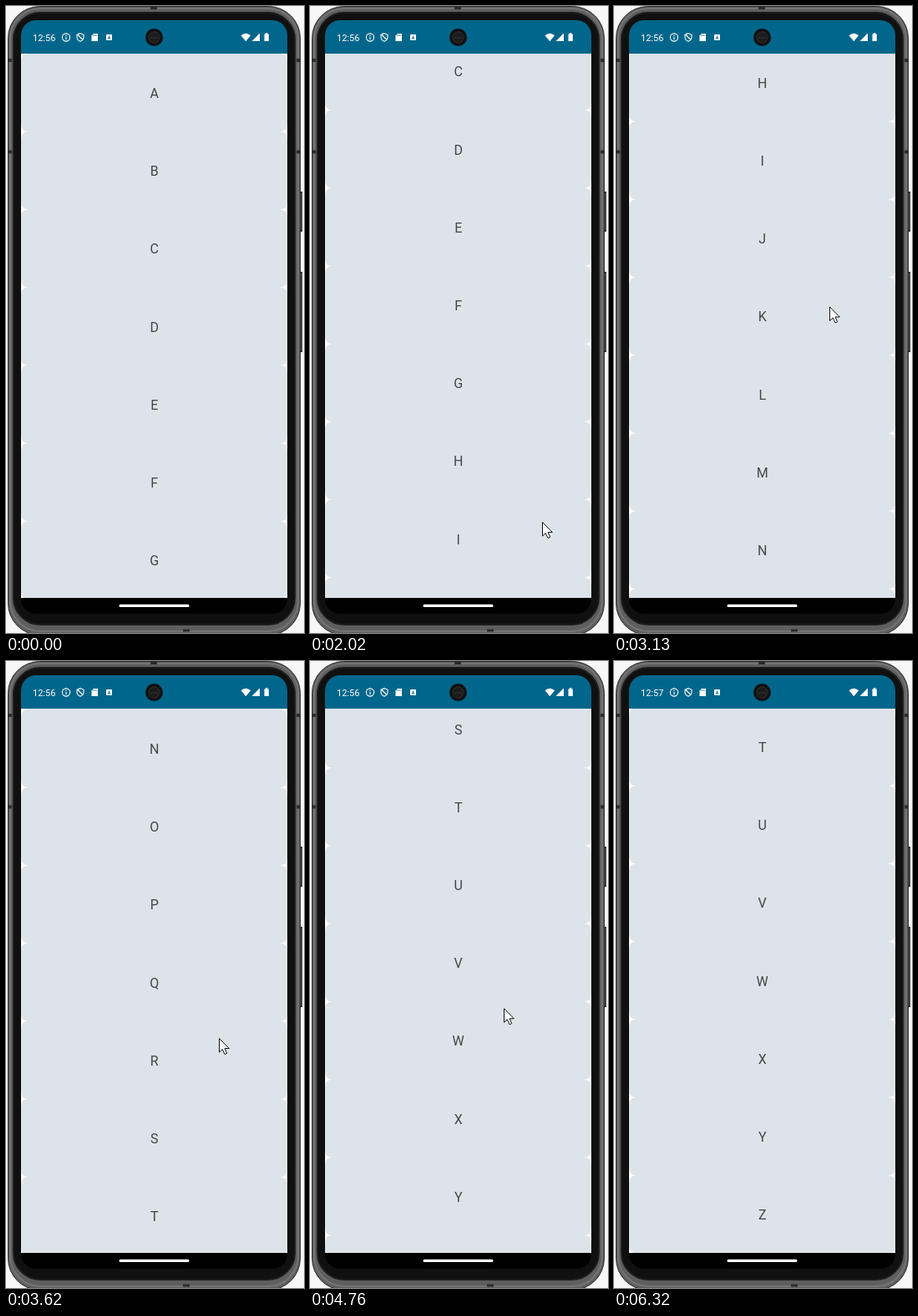
An HTML page that plays this animation: 357 px wide and 750 px high, repeating every 8.08 s.

```html
<!DOCTYPE html>
<html lang="en">
<head>
<meta charset="utf-8">
<title>Letter list</title>
<style>
  html, body { margin: 0; width: 100%; height: 100%; overflow: hidden; background: #f7f7f7; }
  svg { display: block; width: 357px; height: 750px; }
  text { font-family: Roboto, sans-serif; }
  #list text { font-size: 16px; fill: #40484c; text-anchor: middle; }
</style>
</head>
<body>
<svg viewBox="0 0 357 750">
  <defs>
    <clipPath id="view"><path d="M18 57H337V708H18z"/></clipPath>
  </defs>

  <!-- phone body -->
  <path d="M351 222h4v48h-4zM351 318h4v96h-4z" fill="#2b2b2b"/>
  <path d="M353.5 224v44M353.5 320v92" stroke="#555"/>
  <rect x="2.500" y=".5" width="350" height="752" rx="38" fill="#5e5e5e" stroke="#2a2a2a"/>
  <rect x="5" y="3" width="345" height="745" rx="36" fill="none" stroke="#747474" stroke-width="2"/>
  <path d="M2 65h5M348 65h5M2 174.500h5M348 174.500h5" stroke="#2c2c2c" stroke-width="4"/>
  <path d="M173 2.500h8M212 747h8" stroke="#2c2c2c" stroke-width="3"/>
  <rect x="9" y="8" width="337" height="732" rx="32" fill="#101010" stroke="#1c1c1c" stroke-width="2"/>
  <rect x="18" y="17" width="319" height="710" rx="18"/>
  <path d="M18 57V35a18 18 0 0 1 18-18H319a18 18 0 0 1 18 18V57z" fill="#00668b"/>

  <!-- status bar -->
  <text id="clock" x="32" y="41.500" font-size="11" fill="#fff"></text>
  <g fill="none" stroke="#fff" stroke-width="1.100">
    <circle cx="72" cy="37.500" r="4.600"/>
    <path d="M72 36.800v3.400M72 34.700v1.200"/>
    <path d="M89 32.700l4 1.600v3q0 3.500-4 5-4-1.500-4-5v-3zM85.500 34l6.500 6.500"/>
  </g>
  <g fill="#fff">
    <path d="M105 33h5v9h-7.500v-6.500z"/>
    <rect x="120" y="34" width="7" height="7" rx=".8"/>
    <path d="M281.500 35.200q5.800-5 11.600 0l-5.800 7z"/>
    <path d="M304 32.500v9.500h-9.500z"/>
    <path d="M309.500 33.500h1.300v-1.200h2.600v1.200h1.400v8.500h-5.300z"/>
  </g>
  <path d="M104.500 34.200v1.800M106.300 34.200v1.800M108.100 34.200v1.800" stroke="#00668b" stroke-width=".7"/>
  <path d="M122 39.700l1.500-4 1.500 4M122.500 38.500h2" fill="none" stroke="#00668b" stroke-width=".8"/>
  <circle cx="177.500" cy="37.500" r="10.500" fill="#111"/>
  <circle cx="177.500" cy="37.500" r="6.500" fill="#1b1b1b" stroke="#303030"/>
  <path d="M174 38h1.500M177 38h1.500M180 38h1.500" stroke="#555"/>

  <!-- letters -->
  <g clip-path="url(#view)">
    <path d="M18 57H337V708H18z" fill="#dce3e9"/>
    <g id="list"></g>
  </g>
  <rect x="135.500" y="715.700" width="84" height="3.300" rx="1.600" fill="#fff"/>
  <path id="cursor" d="M.5.5V17L4.300 13.500 7 19.500 9.700 18.300 7.100 12.500H12.300z" fill="#fff" stroke="#111" stroke-linejoin="round"/>
</svg>
<script>
const LOOP = 8080, PITCH = 93.2, TOP = 57, BOTTOM = 708, MAX = 1771.8;
const GLIDE = 700, HOLD = 280, BACK = 420; // list travel, finger down, pointer return
const $ = id => document.getElementById(id);

// Each swipe grabs the list at (x, y) and moves it "by" pixels; the first and last only move the pointer.
const swipes = [
  { t: 560, x: 390, y: 605, by: 0 },
  { t: 1260, x: 278, y: 605, by: 212 },
  { t: 2090, x: 278, y: 617, by: 278 },
  { t: 2923, x: 258, y: 534, by: 720.6 },
  { t: 4268, x: 255, y: 451, by: 561.2 },
  { t: 5200, x: 210, y: 600, by: 500 },
  { t: 5900, x: 210, y: 600, by: 0 },
  { t: LOOP, x: 210, y: 1200, by: 0 }
];
const pull = swipes[5]; // runs into the end of the list and stretches it

const ramp = (t, from, span) => Math.min(1, Math.max(0, (t - from) / span));
const smooth = u => u * u * (3 - 2 * u);
const moved = (s, t) => s.by * (1 - (1 - ramp(t, s.t, GLIDE) ** 2) ** 3);

function pointer(t) {
  const i = Math.max(0, swipes.findLastIndex(s => s.t <= t));
  const s = swipes[i], next = swipes[i + 1];
  const y = s.y - moved(s, Math.min(t, s.t + HOLD));
  const back = smooth(ramp(t, s.t + HOLD, BACK));
  return [s.x + back * (next.x - s.x), y + back * (next.y - y)];
}

// white notch left between the rounded corners of two cards
const notch = (x, y, r) =>
  `<path d="M${x} ${y - 9.3}q0 9.3 ${r} 9.3q${-r} 0 ${-r} 9.3z" fill="#fcfcff"/>`;

$('list').innerHTML = [...'ABCDEFGHIJKLMNOPQRSTUVWXYZ '].map((letter, i) => {
  const y = TOP + i * PITCH;
  return notch(18, y, 9.3) + notch(337, y, -9.3) + `<text x="177.7" y="${y + 53}">${letter}</text>`;
}).join('');

function draw(now) {
  const t = now % LOOP;
  const scroll = Math.min(MAX, swipes.reduce((sum, s) => sum + moved(s, t), 0));
  const k = 1 + .03 * Math.sin(Math.PI * ramp(t, pull.t, GLIDE));
  $('list').setAttribute('transform',
    `translate(0 ${BOTTOM * (1 - k)}) scale(1 ${k}) translate(0 ${-scroll})`);
  $('clock').textContent = t < 4960 ? '12:56' : '12:57';
  $('cursor').setAttribute('visibility', t >= 1020 && t < 6320 ? 'visible' : 'hidden');
  $('cursor').setAttribute('transform', `translate(${pointer(t)})`);
}

const start = performance.now();
(function tick() {
  draw(performance.now() - start);
  requestAnimationFrame(tick);
})();
</script>
</body>
</html>
```
